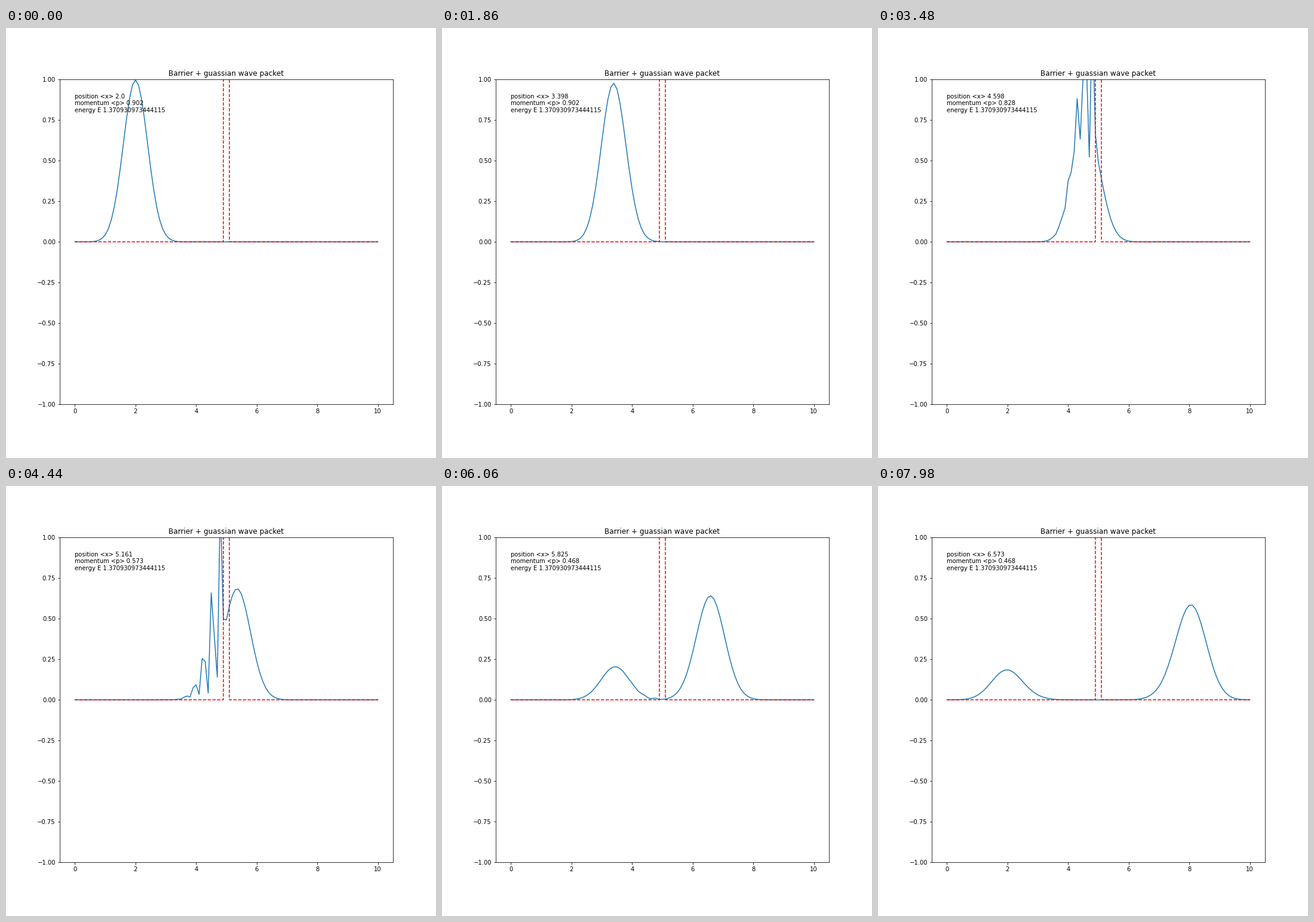
Recreate the animation shown at these times as a matplotlib script. Size 720 px wide and 720 px high, loop 8 s.

```python
import numpy as np
import matplotlib.pyplot as plt
from matplotlib.animation import FuncAnimation

STEP_MS = 60
LOOP_MS = 8000
FRAMES = 400
INTERVAL = LOOP_MS // FRAMES

# Lattice units: hbar = mass = spacing = 1, one site is 0.1 on the x axis
SITES = 101
X = np.arange(SITES) / 10
CENTER, WIDTH, K0 = 20, 4.0, 2.0
BARRIER = 0.508
DT = 0.5
ENERGY = 1.370930973444115


def hamiltonian():
    pot = np.zeros(SITES)
    pot[SITES // 2] = BARRIER
    hop = np.full(SITES - 1, -0.5)
    return np.diag(1 + pot) + np.diag(hop, 1) + np.diag(hop, -1)


def packet():
    n = np.arange(SITES)
    psi = np.exp(-((n - CENTER) / (2 * WIDTH)) ** 2 + 1j * K0 * n)
    return psi / np.linalg.norm(psi)


LEVELS, MODES = np.linalg.eigh(hamiltonian())
COEFFS = MODES.T @ packet()


def state(step):
    return MODES @ (COEFFS * np.exp(-1j * LEVELS * DT * step))


def label(psi):
    prob = np.abs(psi) ** 2
    pos = round(float(np.sum(X * prob)), 3)
    mom = round(float(np.sum(np.conj(psi) * np.gradient(psi)).imag), 3)
    return f"position <x> {pos}\nmomentum <p> {mom}\nenergy E {ENERGY}"


fig = plt.figure(figsize=(10, 10), dpi=72, facecolor="white")
fig.subplots_adjust(left=0.125, right=0.9, bottom=0.125, top=0.88)
ax = fig.add_subplot()
ax.set_title("Barrier + guassian wave packet")
ax.set_xlim(-0.5, 10.5)
ax.set_ylim(-1, 1)
curve, = ax.plot([], [], color="tab:blue")
ax.plot([0, 4.9, 4.9, 5.1, 5.1, 10], [0, 0, 2, 2, 0, 0], "r--")
note = ax.text(0, 0.8, "")


def draw(frame):
    psi = state(frame * INTERVAL // STEP_MS)
    curve.set_data(X, 10 * np.abs(psi) ** 2)
    note.set_text(label(psi))
    return curve, note


anim = FuncAnimation(fig, draw, frames=FRAMES, interval=INTERVAL,
                     repeat=True, repeat_delay=0)
plt.show()
```
